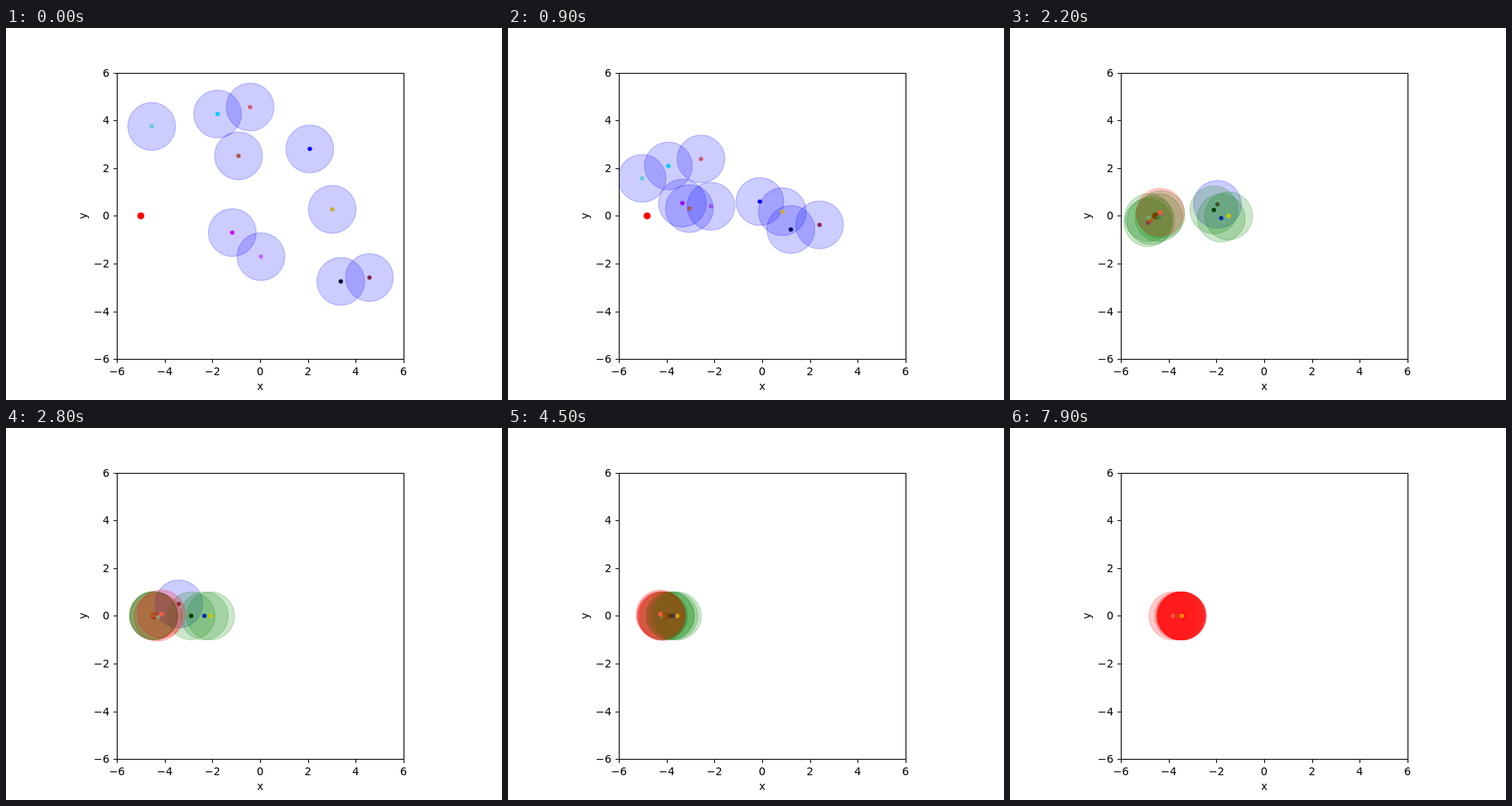
Write an HTML page that moves like this. It is 640x480 px and loops after 8000 ms.

```html
<!DOCTYPE html>
<html lang="en">
<head>
<meta charset="utf-8">
<title>Swarm gathering on a moving beacon</title>
<style>
  html, body { margin: 0; width: 100%; height: 100%; overflow: hidden; background: #fff; }
  svg { display: block; width: 640px; height: 480px; }
  text { font: 13.89px "DejaVu Sans", sans-serif; text-anchor: middle; }
  .ylab { text-anchor: end; }
  .axis { fill: none; stroke: #000; stroke-width: 1.11; }
  .range { fill-opacity: .2; stroke-opacity: .2; stroke-width: 1.39; }
</style>
</head>
<body>
<svg viewBox="0 0 640 480">
  <clipPath id="plot"><rect x="143.2" y="57.6" width="369.6" height="369.6"/></clipPath>
  <g id="swarm" clip-path="url(#plot)"></g>
  <g id="axes">
    <rect class="axis" x="143.5" y="58.5" width="370" height="369"/>
    <text x="328" y="467">x</text>
    <text transform="translate(103.7 242.4) rotate(-90)">y</text>
  </g>
</svg>
<script>
const UNIT = 30.8, CX = 328, CY = 242.4;
const STEP = 100, STEPS = 80;
const KEYS = [0, 9, 16, 28, 45, 61, 79];

// dot colour, steps at which the range turns green and red,
// final lag behind the beacon, then x,y at the first five keys
const AGENTS = [
  ['#00ffff', 14, 40, 2.5, [273, 111, 207, 178, 195, 247, 191, 242, 199, 243]],
  ['#ff00ff', 18, 26, 2, [292, 264, 225, 226, 167, 259, 191, 243, 197, 242]],
  ['#ee82ee', 14, 35, 3, [329, 295, 262, 230, 206, 238, 190.5, 242, 198, 242]],
  ['#a52a2a', 31, 50, 1, [469, 322, 402, 254, 336, 229, 223, 227, 209, 242]],
  ['#000000', 19, 51, 0.5, [432, 327, 365, 260, 299, 227, 239, 242.4, 210, 242.4]],
  ['#0000ff', 12, 53, 0.2, [392, 156, 325, 224, 292, 248, 256, 242.4, 214, 242.4]],
  ['#7fffd4', 19, 24, 2, [188, 127, 173, 194, 163, 245, 196, 244, 199, 243]],
  ['#d2691e', 19, 49, 5.5, [300, 165, 234, 233, 176, 255, 190, 242, 201, 242.4]],
  ['#ffd700', 13, 56, 0.5, [421, 234, 354, 237, 305, 242.4, 264, 242.4, 218.5, 242.4]],
  ['#ff7050', 15, 16, 12.5, [315, 102, 249, 169, 187, 232, 200.5, 240, 196.5, 240]]
];

function add(parent, tag, attrs, text = '') {
  const el = document.createElementNS('http://www.w3.org/2000/svg', tag);
  for (const k in attrs) el.setAttribute(k, attrs[k]);
  el.textContent = text;
  parent.append(el);
  return el;
}

const axes = document.getElementById('axes');
for (let v = -6; v <= 6; v += 2) {
  const x = Math.round(CX + v * UNIT) + .5;
  const y = Math.round(CY - v * UNIT) + .5;
  const label = String(v).replace('-', '\u2212');
  add(axes, 'path', { class: 'axis', d: `M${x} 427.5v4.86M143.5 ${y}h-4.86` });
  add(axes, 'text', { x: CX + v * UNIT, y: 448 }, label);
  add(axes, 'text', { class: 'ylab', x: 133.5, y: y + 4.6 }, label);
}

const beaconX = n => CX + (-5 + .02 * n) * UNIT;

// Speeding up at first, then at full speed
const launch = n => (n < 3.5 ? n * n / 7 : n - 1.75) / 7.25;

// Monotone cubic through the key positions
function track(p) {
  const slope = p.slice(1).map((v, i) => (v - p[i]) / (KEYS[i + 1] - KEYS[i]));
  const tangent = p.map((_, i) => {
    if (i === 0 || i === p.length - 1) return slope[Math.min(i, slope.length - 1)];
    const a = slope[i - 1] * (i === 1 ? 1.24 : 1), b = slope[i];
    return a * b > 0 ? 2 * a * b / (a + b) : 0;
  });
  return n => {
    if (n < KEYS[1]) return p[0] + (p[1] - p[0]) * launch(n);
    let i = 1;
    while (i < KEYS.length - 2 && n >= KEYS[i + 1]) i++;
    const h = KEYS[i + 1] - KEYS[i], u = (n - KEYS[i]) / h, w = 1 - u;
    return p[i] * w * w * (1 + 2 * u) + p[i + 1] * u * u * (3 - 2 * u)
      + h * u * w * (tangent[i] * w - tangent[i + 1] * u);
  };
}

const swarm = document.getElementById('swarm');
const beacon = add(swarm, 'circle', { r: 4.5, cy: CY, fill: '#f00' });
const agents = AGENTS.map(([color, green, red, lag, pts]) => {
  const xs = pts.filter((_, i) => i % 2 === 0);
  const ys = pts.filter((_, i) => i % 2);
  xs.push(beaconX(61) - lag * .7, beaconX(79) - lag);
  ys.push(CY, CY);
  return {
    green, red, x: track(xs), y: track(ys),
    dot: add(swarm, 'circle', { r: 2.8, fill: color }),
    range: add(swarm, 'circle', { r: UNIT, class: 'range' })
  };
});

function draw(now) {
  const n = Math.floor(now / STEP) % STEPS;
  beacon.setAttribute('cx', beaconX(n));
  for (const a of agents) {
    const color = n >= a.red ? '#f00' : n >= a.green ? '#008000' : '#00f';
    for (const el of [a.dot, a.range]) {
      el.setAttribute('cx', a.x(n));
      el.setAttribute('cy', a.y(n));
    }
    a.range.setAttribute('fill', color);
    a.range.setAttribute('stroke', color);
  }
}

const start = performance.now();
function tick() {
  draw(performance.now() - start);
  requestAnimationFrame(tick);
}
tick();
</script>
</body>
</html>
```
